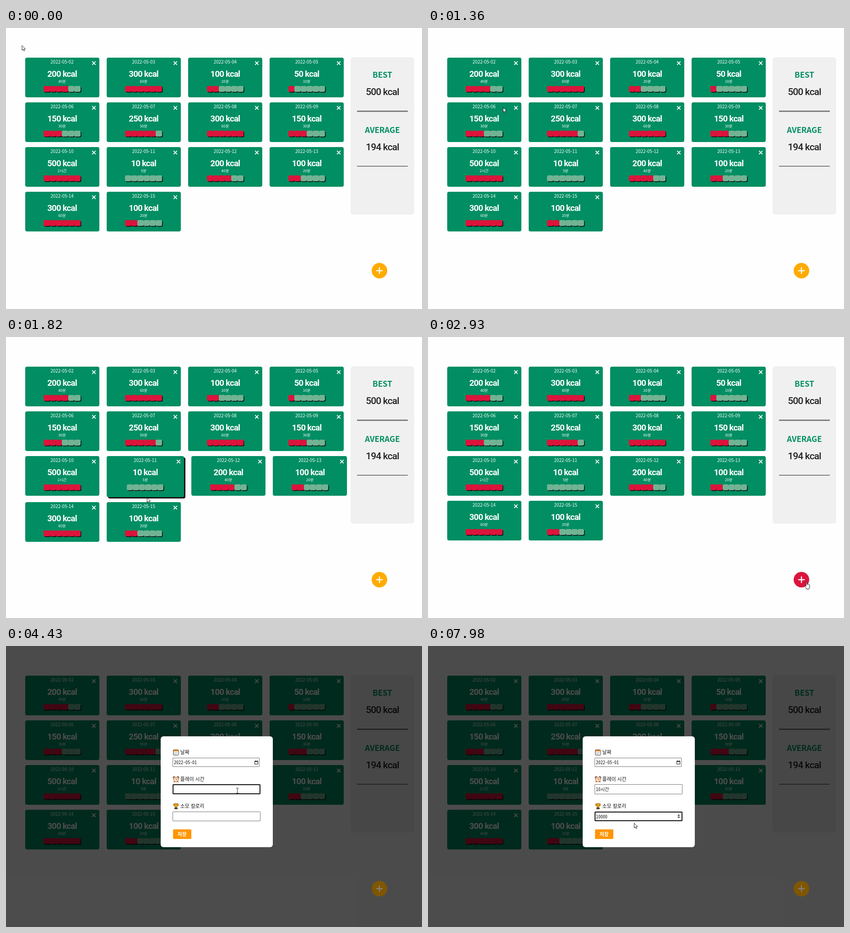
An HTML page for the animation above (8 s loop, 909 by 616 pixels).

```html
<!DOCTYPE html>
<html lang="ko">
<head>
<meta charset="utf-8">
<title>Calorie log</title>
<style>
  :root { --green: #008e62; --red: #dc143c; }
  * { box-sizing: border-box; }
  html, body { margin: 0; width: 100%; height: 100%; overflow: hidden; background: #fefefe; }
  body { font-family: "Noto Sans CJK KR", "Noto Sans CJK", "Noto Sans", sans-serif; }
  #stage { position: relative; width: 909px; height: 616px; overflow: hidden; }
  #stage svg { position: absolute; overflow: visible; }

  #cards { position: absolute; left: 41.5px; top: 65px; }
  .row { display: flex; align-items: flex-start; margin-bottom: 11px; }
  .card { position: relative; flex: none; width: 162px; height: 87px; margin-right: 16.2px;
    border-radius: 4px; background: var(--green); color: #fff; }
  .card.hover { width: 169px; height: 90px; box-shadow: 3px 3px #151515; }
  .line { position: absolute; left: 0; right: 0; line-height: 20px; text-align: center; white-space: nowrap; }
  .date { top: -.6px; font-size: 9.8px; }
  .kcal { top: 25.5px; font: 700 18.5px/20px Roboto, sans-serif; letter-spacing: -.04em; }
  .mins { top: 41.4px; font-size: 8.2px; }
  .card svg { right: 7.5px; top: 7.5px; }
  .bar { position: absolute; top: 62.3px; left: calc(50% - 40.2px); display: flex; }
  .bar i { width: 13.4px; height: 13.2px; border-radius: 3px; background: #72b394; box-shadow: 1.5px 1.5px #0b0b0b; }
  .bar i.on { background: var(--red); }

  #side { position: absolute; left: 753px; top: 63.5px; width: 139px; height: 345px; border-radius: 6px; background: #f0f0f0; }
  .head { color: var(--green); font-size: 17px; font-weight: 700; }
  .total { color: #222; font: 500 21px/20px Roboto, sans-serif; letter-spacing: -.042em; }
  #side hr { position: absolute; left: 13.5px; width: 111.5px; height: 2.5px; margin: 0; border: 0; background: #808080; }

  #shade { position: absolute; inset: 0; background: rgba(0,0,0,.7); }
  #fab { position: absolute; left: 798.7px; top: 515px; width: 34px; height: 34px; border-radius: 50%; background: #ffab00; }
  #fab.hover { background: var(--red); }
  #fab.dim { filter: brightness(.5); }

  #modal { position: absolute; left: 337.5px; top: 197.5px; width: 245.5px; height: 243.5px; border-radius: 6px; background: #fff; }
  .label { position: absolute; left: 43.3px; font-size: 10.8px; font-weight: 500; line-height: 20px; color: #111; white-space: nowrap; }
  .field { position: absolute; left: 26.5px; width: 192px; height: 21.5px; padding-left: 2px; border: 1px solid #767676;
    border-radius: 1px; color: #111; white-space: pre;
    font: 10px/19.5px "Noto Sans Mono CJK KR", "Noto Sans CJK KR", "Noto Sans Mono", monospace; }
  .field.focus { outline: 2px solid #101010; outline-offset: -2px; border-radius: 2px; }
  .field u { text-underline-offset: 1px; text-decoration-thickness: 1px; }
  .caret { display: inline-block; width: 1px; height: 11px; margin-right: -1px; vertical-align: -2px; background: #000; }
  .spin { display: none; }
  .focus + .spin { display: block; }
  #save { position: absolute; left: 27px; top: 204.5px; width: 40.5px; height: 21px; border-radius: 2px; background: #ff9500;
    color: #fff; font-size: 10.8px; font-weight: 700; line-height: 21px; text-align: center; }
  #mouse { left: 0; top: 0; }
</style>
</head>
<body>
<div id="stage">
  <div id="cards"></div>
  <div id="side">
    <div class="line head" style="top:28.3px">BEST</div>
    <div class="line total" style="top:66.5px">500 kcal</div>
    <hr style="top:117.5px">
    <div class="line head" style="top:149px">AVERAGE</div>
    <div class="line total" style="top:187px">194 kcal</div>
    <hr style="top:238px">
  </div>
  <div id="shade"></div>
  <div id="fab">
    <svg width="34" height="34"><path d="M17 10.7v12.6M10.7 17h12.6" stroke="#fff" stroke-width="2.3" stroke-linecap="round"/></svg>
  </div>
  <div id="modal">
    <svg style="left:27.5px;top:29px" width="13" height="13">
      <rect x=".6" y=".6" width="11.4" height="11.6" rx="1" fill="#fff" stroke="#333" stroke-width="1"/>
      <path d="M1 2.4h10.6" stroke="#f08a24" stroke-width="3"/>
      <path d="M2.5 6h7.6M2.5 8h7.6M2.5 10h5" stroke="#8a9299" stroke-width="1" stroke-dasharray="1.4 .6"/>
    </svg>
    <div class="label" style="top:24.8px">날짜</div>
    <div class="field" style="top:47.5px;width:190px;height:20px;line-height:18px">2022-05-01
      <svg style="right:2.5px;top:4.5px" width="8" height="9"><path d="M.6 1.6h6.8v6.4H.6z" fill="none" stroke="#111"/><path d="M.6 2h6.8M2 0v2M6 0v2" stroke="#111" stroke-width="1.3"/></svg>
    </div>

    <svg style="left:27.5px;top:88px" width="13" height="13">
      <path d="M.8 4A2.4 2.4 0 0 1 4.4.9M12.2 4A2.4 2.4 0 0 0 8.6.9M3 10.8l-1.4 1.6M10 10.8l1.4 1.6" fill="none" stroke="#40302a" stroke-width="1.5"/>
      <circle cx="6.5" cy="6.8" r="4.8" fill="#fff4df" stroke="#e8702c" stroke-width="1.7"/>
      <path d="M6.5 4v3l1.8 1" fill="none" stroke="#333"/>
    </svg>
    <div class="label" style="top:83.5px">플레이 시간</div>
    <div class="field" id="time" style="top:105.5px"></div>

    <svg style="left:27.5px;top:147px" width="13" height="13" stroke="#4a3208" stroke-width=".8">
      <path d="M3 1.7H.8Q.8 5.5 4 6M10 1.7h2.2Q12.2 5.5 9 6" fill="none" stroke="#d48a00" stroke-width="1.4"/>
      <path d="M3 .6h7q0 6-2.6 7v1.7H5.6V7.600Q3 6.600 3 .6z" fill="#fba800"/>
      <path d="M3.300 9.400h6.400v2.800H3.300z" fill="#5b4326"/>
    </svg>
    <div class="label" style="top:142.300px">소모 칼로리</div>
    <div class="field" id="burn" style="top:165px"></div>
    <svg class="spin" style="left:207.500px;top:171.500px" width="6" height="9"><path d="M0 3.300L2.800 0l2.800 3.300zM0 5.300l2.800 3.300 2.800-3.300z" fill="#333"/></svg>
    <div id="save">저장</div>
  </div>

  <svg id="mouse" width="1" height="1" stroke="#111" stroke-width=".9" stroke-linejoin="round">
    <path id="arrow" fill="#fff" d="M.5.5v10.300l2.400-2.200 1.700 3.800 1.700-.8-1.700-3.600h3.300z"/>
    <path id="hand" fill="#fff" d="M-1 1q0-1 1-1t1 1v4.500q.2-.8 1.100-.8t1 .9q.2-.6 1.100-.6t1 1q.3-.5 1-.4t.8 1v4.200q0 2-1.200 3v1.700H-.500v-1.700L-3.600 9.600q-.6-1.100.3-1.500t1.500.6l.8.8z"/>
    <path id="beam" fill="none" d="M-2.500-5.500H-.7L0-5l.7-.5h1.800M0-5V5M-2.500 5.500H-.7L0 5l.7.500h1.800"/>
  </svg>
</div>

<script>
const LOOP = 8000, OPEN = 2960, FOCUS_TIME = 3940, FOCUS_BURN = 5940;
const $ = id => document.getElementById(id);

// kcal, duration label, filled cells; one entry per day from May 2nd
const days = [
  [200, '40분', 4], [300, '60분', 6], [100, '20분', 2], [50, '10분', 1],
  [150, '30분', 3], [250, '50분', 5], [300, '60분', 6], [150, '30분', 3],
  [500, '2시간', 6], [10, '5분', 0], [200, '40분', 4], [100, '20분', 2],
  [300, '60분', 6], [100, '20분', 2]
];

const cardHtml = ([kcal, mins, filled], i) => `<div class="card">
  <div class="line date">2022-05-${String(i + 2).padStart(2, '0')}</div>
  <svg width="8" height="8"><path d="M.7.7l6.600 6.600M7.300.7L.7 7.300" stroke="#fff" stroke-width="1.700" stroke-linecap="round"/></svg>
  <div class="line kcal">${kcal} kcal</div>
  <div class="line mins">${mins}</div>
  <div class="bar">${[0, 1, 2, 3, 4, 5].map(n => `<i class="${n < filled ? 'on' : ''}"></i>`).join('')}</div>
</div>`;

const html = days.map(cardHtml);
for (let r = 0; r < html.length; r += 4)
  $('cards').innerHTML += `<div class="row">${html.slice(r, r + 4).join('')}</div>`;
const cards = [...document.querySelectorAll('.card')];

// Mouse stops: time, x, y, easing used to get there
const out = p => 1 - (1 - p) ** 1.6;
const smooth = p => p * p * (3 - 2 * p);
const stops = [
  [900, 34.5, 38], [1360, 163.5, 173.5, p => p ** 1.4], [1820, 306.5, 351.5, p => p],
  [2490, 844, 550, out], [2850, 827, 537, smooth], [3160, 827, 537, smooth],
  [3940, 505.5, 317, smooth], [7660, 505.5, 317, smooth], [7980, 450, 388, smooth]
];

function mouseAt(t) {
  const i = stops.findIndex(s => s[0] > t);
  if (i === 0) return stops[0].slice(1, 3);
  if (i < 0) return stops[stops.length - 1].slice(1, 3);
  const [t0, x0, y0] = stops[i - 1], [t1, x1, y1, ease] = stops[i];
  const p = ease((t - t0) / (t1 - t0));
  return [x0 + (x1 - x0) * p, y0 + (y1 - y0) * p];
}

function cardAt([x, y]) {
  const dx = x - 41.5, dy = y - 65;
  const col = Math.floor(dx / 178.2), row = Math.floor(dy / 98);
  const inside = dx >= 0 && dy >= 0 && col < 4 && dx - col * 178.2 < 162 && dy - row * 98 < 87;
  return inside ? row * 4 + col : -1;
}

// Underscore marks the syllable still being composed
const timeKeys = [[4500, '1'], [4770, '10'], [5240, '10_ㅅ'], [5350, '10_시'], [5470, '10_식'],
  [5640, '10시_가'], [5710, '10시_간'], [FOCUS_BURN, '10시간']];
const burnKeys = [[6210, '1'], [6450, '10'], [6750, '100'], [6950, '1000'], [7120, '10000']];

function drawField(el, keys, t, from, to) {
  const [since, text] = keys.filter(k => k[0] <= t).pop() || [from, ''];
  const focus = t >= from && t < to, composing = text.includes('_');
  const caret = focus && !composing && t - since < (since === 7120 ? 540 : 490);
  el.classList.toggle('focus', focus);
  const markup = text.replace(/_(.)/, '<u>$1</u>') + (caret ? '<span class="caret"></span>' : '');
  if (el.dataset.markup !== markup) el.innerHTML = el.dataset.markup = markup;
}

const within = (v, a, b) => v >= a && v <= b;
const show = (el, on) => { el.style.display = on ? '' : 'none'; };

function render(t) {
  const open = t >= OPEN, [x, y] = mouseAt(t);
  const lagged = mouseAt(t - 40); // hover trails the pointer slightly
  const hovered = open ? -1 : cardAt(lagged);
  cards.forEach((c, i) => c.classList.toggle('hover', i === hovered));

  const onFab = !open && Math.hypot(lagged[0] - 815.7, lagged[1] - 532) < 17;
  $('fab').classList.toggle('hover', onFab);
  $('fab').classList.toggle('dim', open);
  show($('shade'), open);
  show($('modal'), open);
  drawField($('time'), timeKeys, t, FOCUS_TIME, FOCUS_BURN);
  drawField($('burn'), burnKeys, t, FOCUS_BURN, LOOP);

  const hand = onFab || (open && t <= 3160);
  const beam = open && within(x, 364, 556) && (within(y, 303, 324.5) || within(y, 363, 384));
  show($('hand'), hand);
  show($('beam'), beam);
  show($('arrow'), !hand && !beam);
  $('mouse').style.transform = `translate(${x}px, ${y}px)`;
}

const start = performance.now();
(function tick() {
  render((performance.now() - start) % LOOP);
  requestAnimationFrame(tick);
})();
</script>
</body>
</html>
```
